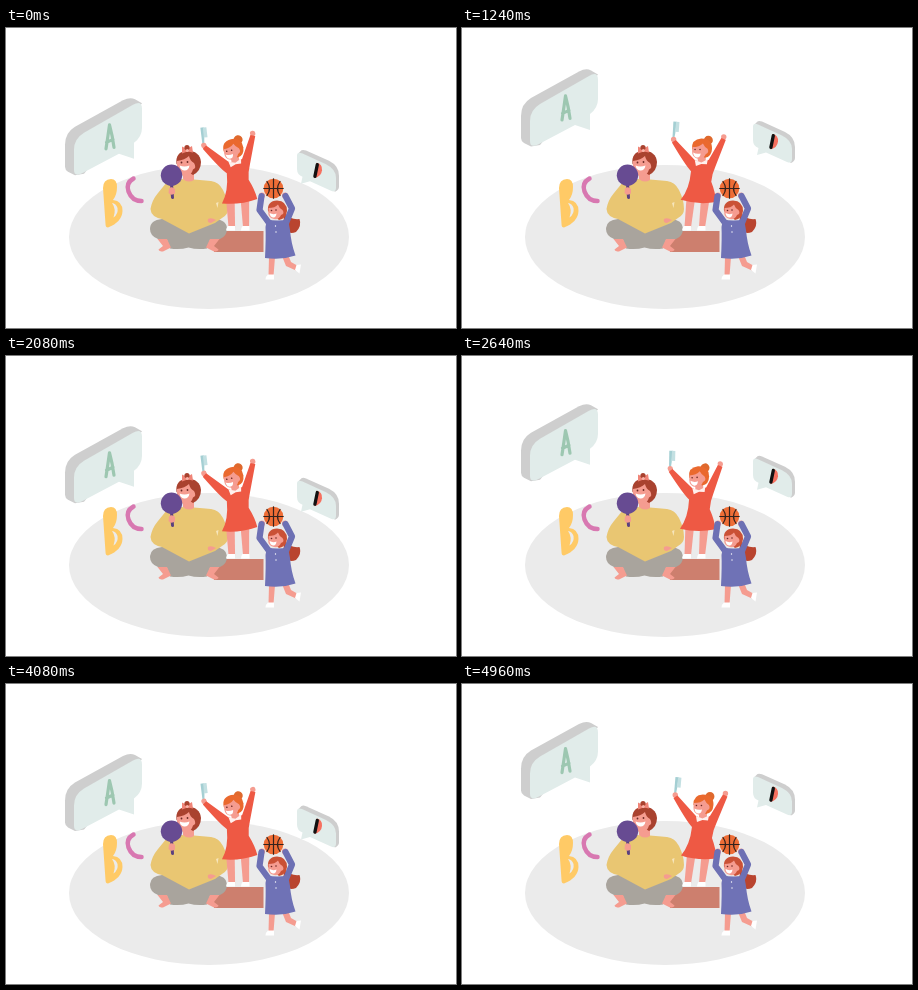
An HTML page that plays this animation: 450x300 px, repeating every 5 s.

```html
<!DOCTYPE html>
<html lang="en">
<head>
<meta charset="utf-8">
<title>Playing with letters</title>
<style>
html, body { margin: 0; width: 100%; height: 100%; overflow: hidden; background: #fff; }
svg { display: block; width: 450px; height: 300px; }
.line { fill: none; stroke-linecap: round; stroke-linejoin: round; }
.skin { fill: #f59c90; }
.white { fill: #fff; }
.eye { fill: #6b2a26; }
</style>
</head>
<body>
<svg viewBox="0 0 450 300">
  <ellipse cx="203" cy="209" rx="140" ry="72" fill="#ebebeb"/>

  <!-- large bubble -->
  <g class="float">
    <path fill="#cecece" d="M59 139V117Q59 105 69 99L117 72.500Q124 69 129 71.500L136 75.500L78 146L69 147.500L62 144Q59 142 59 139Z"/>
    <path fill="#e1ecea" d="M68 142V122Q68 111 78 105L127 77Q136 72 136 81V100Q136 109 128 115V131L113 126L77 145Q68 150 68 142Z"/>
    <path class="line" stroke="#9dc7b1" stroke-width="3.200" d="M100 121Q102 108 103.500 97Q106.500 108 108 119.500M100.500 114.500L107 111.500"/>
  </g>

  <!-- small bubble -->
  <g class="float">
    <path fill="#cecece" d="M292 126L295.500 122.500Q297 121.500 300 122.700L323 133Q333 138 333 148V159Q333 162 329 164L310 150Z"/>
    <path fill="#e1ecea" d="M291 128Q291 123.500 296 125.500L320 136.500Q330 141.500 330 150V160Q330 165 325 163L304 153.500L295 156L296.500 149Q291 147 291 141Z"/>
    <path fill="#f6705f" d="M310.500 135Q316.500 136 316 142.500Q315.500 148.500 308.500 150.500Z"/>
    <path class="line" stroke="#111" stroke-width="3.300" d="M311.300 136.800L308.900 148.500"/>
  </g>

  <!-- loose letters -->
  <path fill="#ffca66" fill-rule="evenodd" d="M97 160Q97 151.500 105 151Q111 151 111 159Q111 167 107 172Q116.500 173 116.500 183Q116 194 102 199.500Q99.500 199.500 99.500 196ZM106 175Q110.500 181 107.500 189.500Q112.500 186 111.500 180Q110 175.500 106 175Z"/>
  <path class="line" stroke="#d878b1" stroke-width="4.500" stroke-linecap="butt" d="M127.500 150.500Q119.500 155 122.500 163.500Q126 173 135.500 173"/>

  <path fill="#cd7f6e" d="M208 203H257.500V224H208Z"/>

  <!-- seated figure -->
  <path fill="#a9a49d" d="M156 191Q144 192 144 201Q144 208 152 211L161 212L164 220.500Q174 222 182.500 219.500Q191 222 201 220.500L204 212L214 211Q221 208 221 201Q221 192 209 191Z"/>
  <path class="skin" d="M151.500 211L161 211L165 219.500L157 223.500Q153 223.500 152.500 221.500L157 218ZM213.500 211L204 211L200 219.500L208 223.500Q212 223.500 212.500 221.500L208 218Z"/>
  <path fill="#e9c672" d="M161 154Q171 150 188 151.500L205 153Q213 154 217 162Q222 172 222 181Q222 187 216 190L209 195L183 205.500L156 191Q145 189 144.500 181Q146 172 152 165Z"/>
  <path class="skin" d="M202 191Q205 189 210 192L205 195Q201 195 202 191Z"/>
  <path fill="#f7e6bc" d="M210 175L212.500 174L211.500 180Z"/>
  <path class="skin" d="M177 145H188V152Q182 155.500 177 151Z"/>
  <path fill="#a9422f" d="M170.500 136Q169 124 181 122.500Q194 123 195 134Q195 143 187 147L173 138Z"/>
  <path class="skin" d="M171 133Q179 132 183 128Q184 133 188 135Q191 140 187 141.500Q185 149 178 148Q170 146 171 136Z"/>
  <path class="white" d="M173.500 137.500Q178.500 139.500 183.500 137.500Q182.500 143 178 142.500Q174.500 142 173.500 137.500Z"/>
  <circle class="eye" cx="175.500" cy="134.500" r=".9"/>
  <circle class="eye" cx="181.500" cy="134" r=".9"/>
  <path fill="#f08578" d="M176 118.500L181 121L186 118L187 124.500L181.500 123.500L176 125.500Z"/>
  <circle cx="181" cy="119.500" r="2.600" fill="#a9422f"/>
  <circle cx="181.300" cy="122.500" r="1.500" fill="#f9b3a8"/>
  <path class="line" stroke="#5b407f" stroke-width="3" d="M165.500 156L166.500 169.500"/>
  <circle cx="165.500" cy="147.200" r="10.700" fill="#674b92"/>
  <path class="skin" d="M163 160.500Q166 158 169 161V165.500Q165 168 162.500 165Z"/>

  <!-- girl with raised arms -->
  <g id="legs" class="skin">
    <path d="M222.500 172H231L229 200H222.500Z"/>
    <path d="M237 172H245.500L243 200H237Z"/>
  </g>
  <path class="white" d="M222 198H229V202.500H220Q220 200 222 198ZM236.500 198H243.500V202.500H235Q235 200 236.500 198Z"/>
  <g id="girl">
    <path fill="#a4cfd3" d="M213.500 93L216.800 93.300L215.200 104L213.800 111H212Z"/>
    <path fill="#c3e0e2" d="M216.300 93.300L219.500 93.700L218.600 103.700L214.800 103.300Z"/>
    <circle class="skin" cx="213.300" cy="111" r="2.700"/>
    <circle class="skin" cx="263.500" cy="109.500" r="2.700"/>
    <path fill="#ee5944" d="M211.500 114L215.500 111.500L234 132Q241 136 248 132L261 110.500L265.500 112.500L254.500 139Q251 146 250 154Q254 165 254.500 174.500Q236 177 219 171.500Q228 161 230 143Q225 138 211.500 114Z"/>
    <path class="skin" d="M237 128H245V134Q241 137 237 134Z"/>
    <path fill="#fff0ed" d="M234 132L240.500 134.500L247 131.500L246 136.500L240.500 136L235 138Z"/>
    <circle cx="248" cy="112.500" r="4.500" fill="#df692d"/>
    <path fill="#ea692e" d="M231.500 121Q231 111 241 110.500Q252 111 251.500 121Q251 129 244 130L234 123Z"/>
    <path class="skin" d="M232 119Q239 119 242.500 115.500Q244 119 247 121Q249 125 245 126.500Q243 131.500 238 131Q231 130 231.500 123Z"/>
    <path class="white" d="M232.500 124.500Q236 126.500 240 125.500Q239.500 130 236 129.500Q233 129 232.500 124.500Z"/>
    <circle class="eye" cx="234.500" cy="121.500" r=".8"/>
    <circle class="eye" cx="239.500" cy="121.500" r=".8"/>
  </g>

  <!-- child with ball -->
  <path fill="#b9442f" d="M278 186Q285 192 293.500 191Q296 198 290 204Q282 207 277 200Z"/>
  <path class="skin" d="M263 229H269L267.500 248H262.500ZM276 228L282 226.500L285 234L292 238L290 242.500L280 238Z"/>
  <path class="white" d="M262 246.500H268V251.500H259.500Q259.500 248.500 262 246.500ZM290.500 237L295 236.500L293.500 245.500L289 242Z"/>
  <circle class="skin" cx="256" cy="167.500" r="3"/>
  <circle class="skin" cx="279" cy="167.500" r="3"/>
  <path class="line" stroke="#6d70b4" stroke-width="6.200" stroke-linecap="butt" d="M255.500 168L253.500 182L263 195M279.500 168L286 180.500L280 195"/>
  <path fill="#6f72b6" d="M261 191Q271 194 282 191L284 202Q285 215 289.500 227.500Q275 232.500 259 230Q260 210 259.500 199Z"/>
  <circle cx="269.500" cy="198" r=".7" class="white"/>
  <circle cx="270" cy="204" r=".7" class="white"/>
  <path fill="#ca5136" d="M262 183Q261 173 271 172.500Q281 173 281 183Q280 191 273 192L264 185Z"/>
  <path class="skin" d="M262.500 180Q269 180 272 176.500Q273 180 276.500 182Q279 186 275 187Q273 192 268 191Q261 190 262.500 182Z"/>
  <path class="white" d="M263.500 185Q267 187 270.500 185.500Q270 190 267 189.500Q264 189 263.500 185Z"/>
  <circle class="eye" cx="265.500" cy="182.500" r=".8"/>
  <circle class="eye" cx="270" cy="182" r=".8"/>
  <circle cx="267.500" cy="160.500" r="9.800" fill="#ee6d36"/>
  <path class="line" stroke="#33221d" stroke-width="1.200" d="M257.800 160.500H277.200M267.500 150.800V170.200M261 153.500Q266 160.500 261 167.500M274 153.500Q269 160.500 274 167.500"/>
</svg>
<script>
const LOOP = 5000, STEP = 40, RISE = 32.5, LEAN = 12;
const floats = document.querySelectorAll('.float');
const girl = document.getElementById('girl');
const legs = document.getElementById('legs');

// 0 at the lowest point, 1 at the highest; one swing takes about two seconds
function swing(t) {
  const lag = 42 - 0.009 * t;
  return (1 - Math.cos(Math.PI * (t - lag) / 1000)) / 2;
}

function draw(t) {
  const k = swing(t);
  floats.forEach(el => el.setAttribute('transform', `translate(0 ${-RISE * k})`));
  girl.setAttribute('transform', `rotate(${LEAN * (k - 1)} 236 188)`);
  const skew = 5 - 10 * k;
  legs.setAttribute('transform', `translate(0 199) skewX(${skew}) translate(0 -199)`);
}

const start = performance.now();
function tick() {
  const t = (performance.now() - start) % LOOP;
  draw(Math.floor(t / STEP) * STEP);
  requestAnimationFrame(tick);
}
tick();
</script>
</body>
</html>
```
